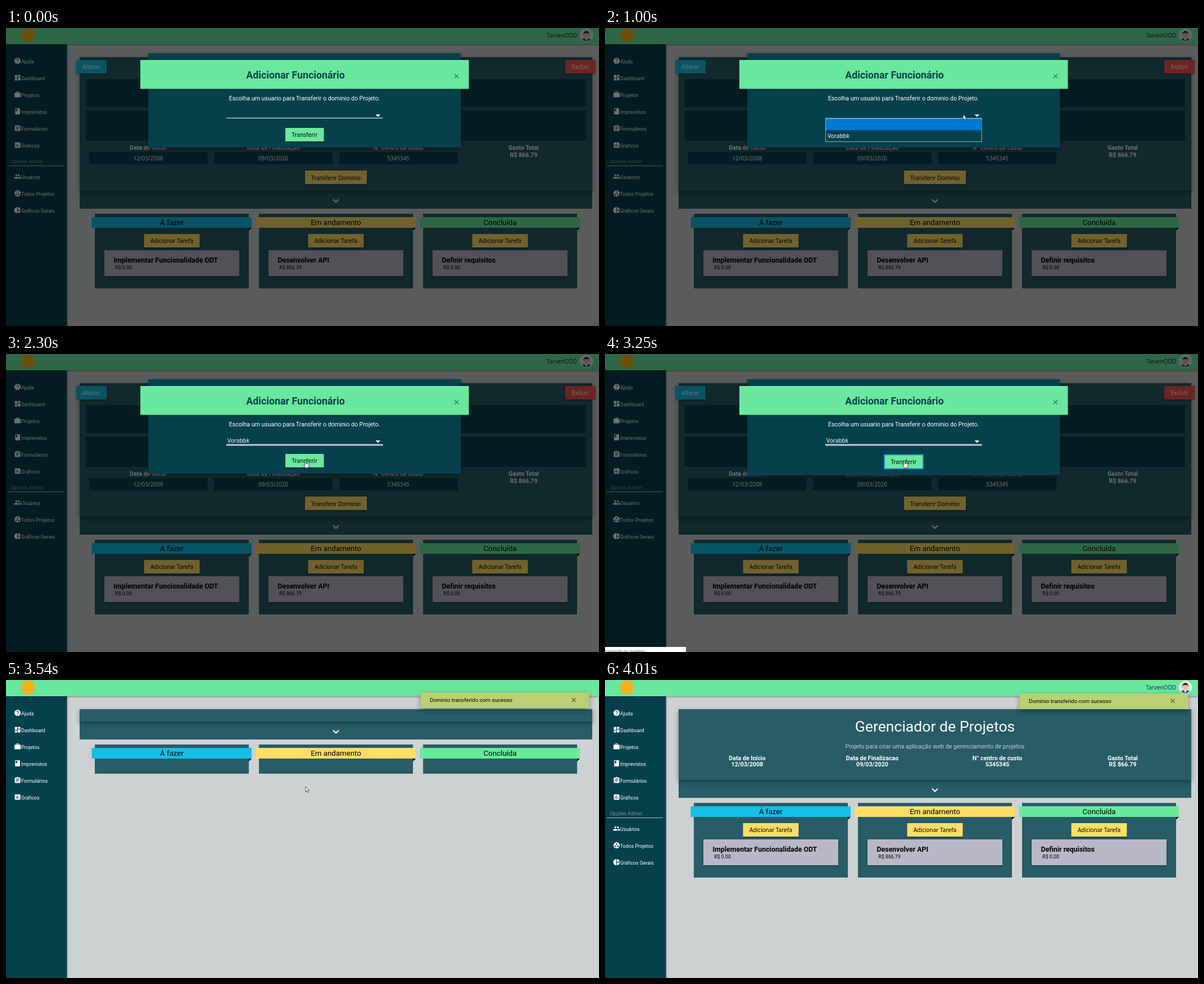
These frames come from a looping animation (1055x531 px, 4560 ms). An HTML page:

```html
<!DOCTYPE html>
<html lang="pt">
<head>
<meta charset="utf-8">
<title>Gerenciador de Projetos</title>
<style>
:root { --deep: #05404d; --panel: #285c66; --green: #69e89e; --yellow: #ffdd66; --cyan: #13bfe6; }
html, body { margin: 0; width: 100%; height: 100%; overflow: hidden; background: #cdd1d1; }
svg { display: block; width: 1055px; height: 531px; }
text { font-family: Roboto, sans-serif; font-size: 10.65px; fill: #fff; }
.mid { text-anchor: middle; }
.bold { font-weight: 700; }
.dark { fill: #000; }
.ui { font-family: "Noto Sans", "Open Sans", sans-serif; font-size: 10px; }
.nav text { font-size: 8.8px; }
.lift { filter: drop-shadow(0 1px 1.5px rgba(0,0,0,.4)); }
.float { filter: drop-shadow(0 3px 4px rgba(0,0,0,.4)); }
.field { fill: var(--deep); }

/* One shared 4560 ms clock; every change is a step */
.t { animation: 4560ms step-end infinite; }
.editing { animation-name: editing; }
.loaded { animation-name: loaded; }
.filled { animation-name: filled; }
.shift { animation-name: shift; }
.panel { fill: var(--panel); animation-name: panel; }
.section { fill: var(--panel); animation-name: section; }
.column { fill: var(--panel); animation-name: column; }
.thin { animation-name: thin; }
.thick { animation-name: thick; }
.popup { animation-name: popup; }
.pick { animation-name: pick; }
.value { animation-name: value; }
.modal { fill: var(--deep); animation-name: modal; }
.rest { animation-name: rest; }
.ring { animation-name: ring; }
.label { animation-name: label; }
.status { animation-name: status; }
.alert { animation-name: alert; }
.cursor { animation-name: cursor; }
.arrow { animation-name: arrow; }
.hand { animation-name: hand; }

@keyframes editing { 0% { opacity: 1 } 72.807%, 100% { opacity: 0 } }
@keyframes loaded { 0% { opacity: 0 } 80.263%, 100% { opacity: 1 } }
@keyframes filled { 0% { opacity: 1 } 72.807% { opacity: 0 } 80.263%, 100% { opacity: 1 } }
@keyframes shift {
  0% { transform: none }
  72.807% { transform: translateY(-216px) }
  80.263%, 100% { transform: translateY(-112px) }
}
@keyframes panel { 0% { height: 270px } 72.807% { height: 54px } 80.263%, 100% { height: 158px } }
@keyframes section { 0% { height: 238px } 72.807% { height: 22px } 80.263%, 100% { height: 126px } }
@keyframes column { 0% { height: 133px } 72.807% { height: 52px } 80.263%, 100% { height: 133px } }
@keyframes thin { 0% { opacity: 1 } 16.447%, 100% { opacity: 0 } }
@keyframes thick { 0% { opacity: 0 } 16.447%, 100% { opacity: 1 } }
@keyframes popup { 0% { opacity: 0 } 18.202% { opacity: 1 } 40.351%, 100% { opacity: 0 } }
@keyframes pick { 0% { transform: none } 36.69%, 100% { transform: translateY(20px) } }
@keyframes value { 0% { opacity: 0 } 40.351%, 100% { opacity: 1 } }
@keyframes modal {
  0% { height: 168px } 62.5% { height: 169px } 64.3% { height: 170px } 66.228%, 100% { height: 171px }
}
@keyframes rest { 0% { opacity: 1 } 62.5%, 100% { opacity: 0 } }
@keyframes ring { 0% { opacity: 0 } 62.5%, 100% { opacity: 1 } }
@keyframes label { 0% { transform: none } 62.5%, 100% { transform: translateY(2px) } }
@keyframes status { 0% { opacity: 0 } 71.272% { opacity: 1 } 74.561%, 100% { opacity: 0 } }
@keyframes alert {
  0% { opacity: 0; transform: translateY(-8px) }
  75.877% { opacity: .6; transform: translateY(-8px) }
  77.632% { opacity: 1; transform: translateY(-2px) }
  80.263%, 100% { opacity: 1; transform: none }
}
@keyframes cursor {
  0% { transform: translate(1100px, 600px) }
  4.605% { transform: translate(971px, 452px); animation-timing-function: steps(3, end) }
  9.759% { transform: translate(760px, 262px); animation-timing-function: steps(3, end) }
  14.912% { transform: translate(644px, 157px) }
  16.447% { transform: translate(640px, 155px) }
  20.175% { transform: translate(637px, 154px) }
  28.289% { transform: translate(635px, 157px); animation-timing-function: steps(6, end) }
  38.377% { transform: translate(544px, 191px) }
  48.904% { transform: translate(538px, 190px) }
  50.439% { transform: translate(533px, 190px) }
  80.263% { transform: translate(655px, 250px) }
  81.36% { transform: translate(787px, 333px) }
  82.895% { transform: translate(870px, 400px); animation-timing-function: steps(3, end) }
  87.939%, 100% { transform: translate(1110px, 590px) }
}
@keyframes arrow { 0% { opacity: 1 } 48.904% { opacity: 0 } 74.561%, 100% { opacity: 1 } }
@keyframes hand { 0% { opacity: 0 } 48.904% { opacity: 1 } 74.561%, 100% { opacity: 0 } }
</style>
</head>
<body>
<svg viewBox="0 0 1055 531" xmlns="http://www.w3.org/2000/svg">
  <defs>
    <clipPath id="face"><circle cx="1032.5" cy="13" r="10.5"/></clipPath>
  </defs>
  <rect width="1055" height="531" fill="#cdd1d1"/>

  <!-- Project panel -->
  <rect class="t panel" x="131" y="52" width="912" height="270"/>
  <g class="float"><rect class="t section" x="131" y="52" width="912" height="238"/></g>

  <g class="t editing">
    <g class="lift">
      <rect x="125" y="57" width="54" height="24" fill="var(--cyan)"/>
      <rect x="995" y="57" width="54" height="24" fill="#f55454"/>
      <rect x="532" y="254" width="110" height="24" fill="var(--yellow)"/>
    </g>
    <text class="ui mid" x="152" y="73">Alterar</text>
    <text class="ui mid" x="1022" y="73">Excluir</text>
    <text class="ui mid dark" x="587" y="270.5">Transferir Domínio</text>
    <g class="field">
      <rect x="142" y="91" width="890" height="50"/>
      <rect x="142" y="147" width="890" height="54"/>
      <rect x="148" y="221" width="210.500" height="22"/>
      <rect x="370.500" y="221" width="210.500" height="22"/>
      <rect x="593" y="221" width="210.500" height="22"/>
    </g>
    <g class="mid bold">
      <text x="253" y="216.500">Data de Início</text>
      <text x="475.500" y="216.500">Data de Finalização</text>
      <text x="698" y="216.500">N° centro de custo</text>
      <text x="921" y="216.500">Gasto Total</text>
      <text x="921" y="230">R$ 866.79</text>
    </g>
    <g class="mid">
      <text class="ui" x="253" y="236">12/03/2008</text>
      <text class="ui" x="475.500" y="236">09/03/2020</text>
      <text class="ui" x="698" y="236">5345345</text>
    </g>
  </g>

  <g class="t loaded mid">
    <text x="587" y="92" style="font-size:26.6px">Gerenciador de Projetos</text>
    <text x="587" y="121.500" style="fill:#c6cdd0">Projeto para criar uma aplicação web de gerenciamento de projetos</text>
    <g class="bold">
      <text x="253" y="143">Data de Início</text>
      <text x="253" y="154">12/03/2008</text>
      <text x="475.500" y="143">Data de Finalizacao</text>
      <text x="475.500" y="154">09/03/2020</text>
      <text x="698" y="143">N° centro de custo</text>
      <text x="698" y="154">5345345</text>
      <text x="921" y="143">Gasto Total</text>
      <text x="921" y="154">R$ 866.79</text>
    </g>
  </g>

  <g class="t shift">
    <path d="M582 305.500l5 5 5-5" fill="none" stroke="#fff" stroke-width="2"/>
    <g id="board"></g>
  </g>

  <!-- Side menu and top bar -->
  <rect class="lift" y="29" width="108.500" height="502" fill="var(--deep)"/>
  <g class="nav" id="menu"></g>
  <g class="nav t filled">
    <text x="8.500" y="240.500" style="fill:#82969c">Opções Admin</text>
    <rect x="3" y="245" width="100" height="1" fill="#b4c0c3"/>
    <g id="admin"></g>
  </g>
  <rect class="lift" width="1055" height="29" fill="var(--green)"/>
  <circle cx="39" cy="13" r="12.500" fill="#f3b21b"/>
  <g class="t filled">
    <text class="ui" x="1016" y="17" text-anchor="end" style="fill:#0b3055">TarvenODD</text>
    <circle cx="1032.500" cy="13" r="11.500" fill="#fff"/>
    <g clip-path="url(#face)">
      <circle cx="1032.500" cy="13" r="10.500" fill="#d3e3ee"/>
      <path d="M1023 26c0-6 3-8 9.500-8s9.500 2 9.500 8z" fill="#2a5ba5"/>
      <path d="M1029.500 17h6l-3 6z" fill="#fff"/>
      <ellipse cx="1032.500" cy="12.500" rx="4.500" ry="5.500" fill="#f1bb91"/>
      <path d="M1027.500 12c-1-9 11-9 10 0l-1.500-3h-7z" fill="#2b2428"/>
    </g>
  </g>

  <!-- Dialog -->
  <g class="t editing">
    <rect width="1055" height="531" fill="#000" opacity=".56"/>
    <g class="float"><rect class="t modal" x="253" y="45" width="556.500" height="168"/></g>
    <rect class="lift" x="239" y="57" width="584.500" height="51.500" fill="var(--green)"/>
    <text class="mid bold" x="515" y="90" style="font-size:17.8px;fill:var(--deep)">Adicionar Funcionário</text>
    <path d="M798 82.500l7 7m0-7l-7 7" stroke="#35745a" stroke-width="1.300"/>
    <text class="mid" x="531" y="129">Escolha um usuario para Transferir o dominio do Projeto.</text>

    <path d="M657.500 154h8.500l-4.250 4.500z" fill="#fff"/>
    <rect class="t thin" x="392" y="160" width="278.500" height="1" fill="#fff"/>
    <rect class="t thick" x="392" y="160.500" width="278.500" height="3" fill="#c3c7d5"/>
    <text class="ui t value" x="394" y="158">Vorabbk</text>

    <g class="t rest"><rect class="lift" x="497" y="178" width="68.500" height="24" fill="var(--green)"/></g>
    <rect class="t ring" x="497" y="179.500" width="69" height="25" fill="var(--green)" stroke="#1c86dc" stroke-width="1.800"/>
    <g class="t label"><text class="ui mid dark" x="531.300" y="194">Transferir</text></g>

    <g class="t popup">
      <rect x="392.500" y="161.500" width="277.500" height="41" fill="var(--deep)" stroke="#a3b1b6"/>
      <rect class="t pick" x="393" y="162" width="276.500" height="20" fill="#0078d7"/>
      <text class="ui" x="396" y="195.500">Vorabbk</text>
    </g>
  </g>

  <!-- Notice, status line, pointer -->
  <g class="t alert">
    <rect class="float" x="737.500" y="24" width="300" height="28" fill="#bbd074"/>
    <text class="dark" x="754" y="41.200" style="font-size:9.8px">Dominio transferido com sucesso</text>
    <path d="M1006.500 34l7 7m0-7l-7 7" stroke="#59653f" stroke-width="1.300"/>
  </g>
  <g class="t status">
    <rect y="522" width="144" height="9" fill="#fff"/>
    <text class="ui" x="0" y="530.500" style="font-size:6.15px;fill:#5a5560">Esperando por localhost...</text>
  </g>
  <g class="t cursor" stroke="#111" stroke-width=".7" fill="#fff" stroke-linejoin="round">
    <path class="t arrow" d="M0 0V9L2 7.200 3.400 10.600 5 9.900 3.600 6.700H6.400Z"/>
    <path class="t hand" d="M-1 1a1 1 0 0 1 2 0V5l4 .8q1 .3 1 1.400L5.500 10 4.500 13H-.5L-3 8.500q-.4-1.300.7-1.300L-1 8.200Z"/>
  </g>
</svg>
<script>
const byId = id => document.getElementById(id);
const hole = 'fill="var(--deep)"';
const disc = '<circle cx="12" cy="12" r="10"/>';
const dot = (x, y, r, attr = '') => `<circle cx="${x}" cy="${y}" r="${r}" ${attr}/>`;
const box = (x, y, w, h, attr = '') => `<rect x="${x}" y="${y}" width="${w}" height="${h}" ${attr}/>`;

// Icons on a 24-unit grid
const icons = {
  help: disc + '<path d="M9 9a3 3 0 1 1 5 2.200c-1.300 1-2 1.700-2 3.800" fill="none" stroke="var(--deep)" stroke-width="2"/>' + box(11, 17, 2, 2, hole),
  tiles: box(3, 3, 8, 10) + box(3, 15, 8, 6) + box(13, 11, 8, 10) + box(13, 3, 8, 6),
  bag: box(2, 6, 20, 15, 'rx="2"') + '<path d="M9 7V3h6v4" fill="none" stroke="#fff" stroke-width="2"/>',
  book: box(4, 2, 16, 20, 'rx="2"') + `<path d="M6 4h5v8l-2.500-1.500L6 12z" ${hole}/>`,
  form: box(3, 3, 18, 18, 'rx="2"') + dot(12, 4, 3) + dot(12, 4, 1, hole) +
    box(7, 7, 10, 2, hole) + box(7, 11, 10, 2, hole) + box(7, 15, 7, 2, hole),
  chart: box(3, 3, 18, 18, 'rx="2"') + box(7, 10, 2, 7, hole) + box(11, 7, 2, 10, hole) + box(15, 13, 2, 4, hole),
  people: dot(8, 8, 3) + dot(16, 8, 3) +
    '<path d="M1 19v-2.500c0-4.700 14-4.700 14 0V19zM17 19v-2.500q0-2-2-3.400c3-.5 8 .6 8 3.400V19z"/>',
  group: disc + dot(12, 8, 2.5, hole) + dot(8, 15, 2.5, hole) + dot(16, 15, 2.5, hole),
  pie: '<path d="M11 2v20a10 10 0 0 1 0-20zM13 2v9h9a10 10 0 0 0-9-9zM13 13v9a10 10 0 0 0 9-9z"/>'
};

const menu = (top, items) => items.map(([icon, name], i) => {
  const y = top + i * 30;
  return `<g transform="translate(14 ${y - 7}) scale(.55)" fill="#fff">${icons[icon]}</g>
    <text x="27" y="${y + 3.5}">${name}</text>`;
}).join('');

byId('menu').innerHTML = menu(59, [['help', 'Ajuda'], ['tiles', 'Dashboard'], ['bag', 'Projetos'],
  ['book', 'Imprevistos'], ['form', 'Formulários'], ['chart', 'Gráficos']]);
byId('admin').innerHTML = menu(265, [['people', 'Usuários'], ['group', 'Todos Projetos'], ['pie', 'Gráficos Gerais']]);

const column = ([name, color, task, cost], i) => `
  <g transform="translate(${158 + i * 292} 331)">
    <rect class="t column" width="274" height="133"/>
    ${box(-5.5, 6, 284.5, 19, `fill="${color}"`)}
    <path d="M274 25h5l-5 5z"/>
    <text class="mid dark" x="137" y="20.200" style="font-size:13.3px">${name}</text>
    <g class="t filled">
      ${box(87.5, 36, 99, 24, 'class="lift" fill="var(--yellow)"')}
      <text class="ui mid dark" x="137" y="52">Adicionar Tarefa</text>
      ${box(17, 65, 240, 46, 'class="lift" fill="#b9b8c6"')}
      <text class="bold dark" x="33.500" y="87" style="font-size:12.4px">${task}</text>
      <text class="dark" x="36.300" y="99" style="font-size:8.8px">${cost}</text>
    </g>
  </g>`;

byId('board').innerHTML = [
  ['Á fazer', 'var(--cyan)', 'Implementar Funcionalidade ODT', 'R$ 0.00'],
  ['Em andamento', 'var(--yellow)', 'Desenvolver API', 'R$ 866.79'],
  ['Concluída', 'var(--green)', 'Definir requisitos', 'R$ 0.00']
].map(column).join('');
</script>
</body>
</html>
```
